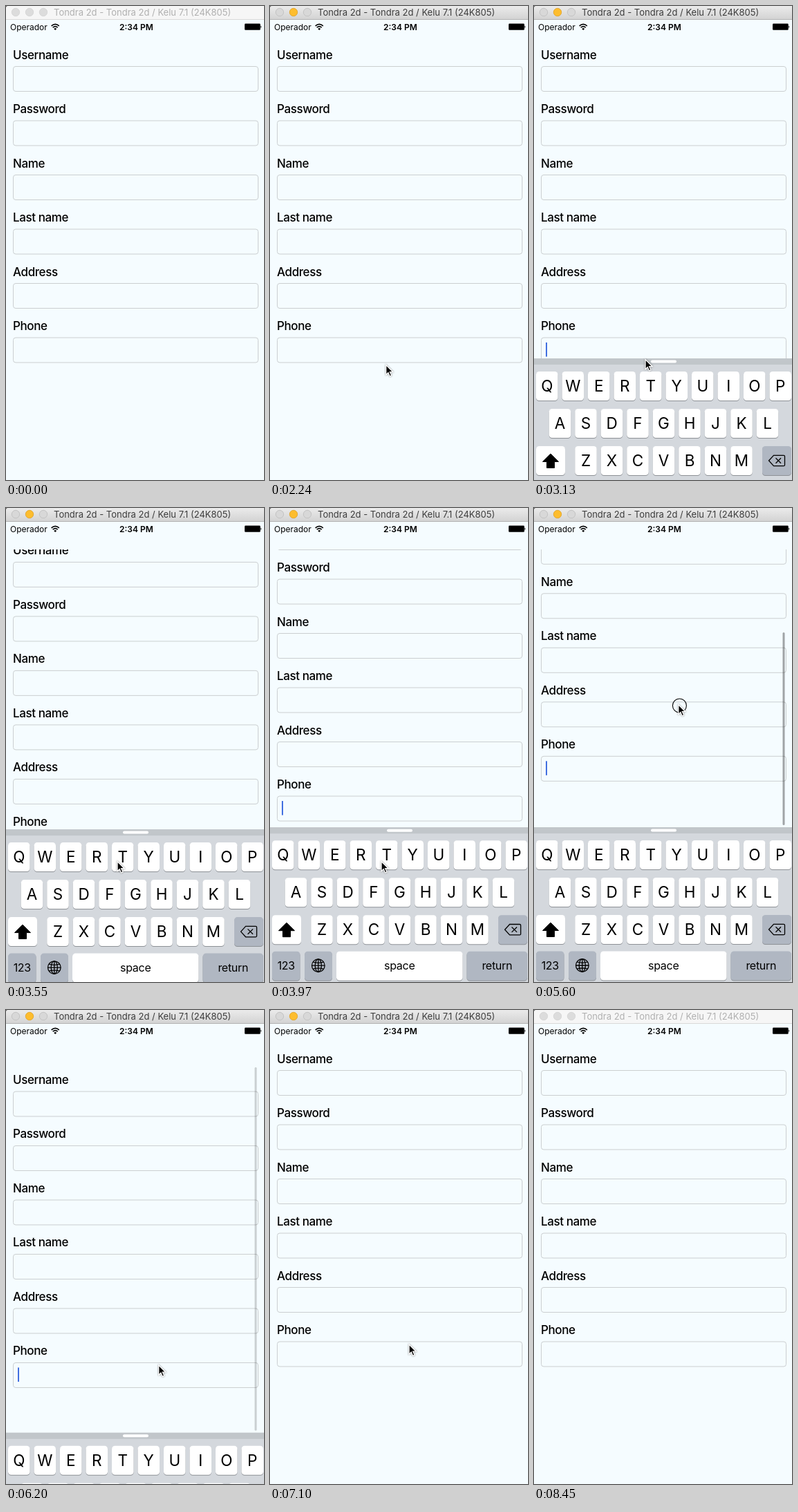
Write an HTML page that moves like this. It is 373x686 px and loops after 8550 ms.

```html
<!DOCTYPE html>
<html lang="en">
<head>
<meta charset="utf-8">
<title>Form with keyboard</title>
<style>
  html, body { margin: 0; width: 100%; height: 100%; overflow: hidden; background: #f5fcff; }
  svg { display: block; width: 100%; height: 100%; }
  text { font-family: Inter, Roboto, sans-serif; }
  .label { font-size: 17px; font-weight: 500; letter-spacing: -.4px; }
  .field { fill: none; stroke: #cbcfd0; }
  .status { font-size: 12px; }
  .clock { font-weight: 600; }
  .key { fill: #fff; }
  .key.dark { fill: #b0b7c2; }
  .shade { fill: #8d9196; }
  .cap { font-size: 22.5px; text-anchor: middle; }
  .word { font-size: 16px; letter-spacing: -.3px; text-anchor: middle; }
  .line { fill: none; stroke: #000; stroke-width: 1.3; }
  .title { font-size: 13px; fill: #b0b0b0; }
  .bar { fill: #f6f6f6; }
  .edge { fill: #d9d9d9; }
  .dot { fill: #dcdcdc; stroke: #d2d2d2; stroke-width: .8; }
  .active .title { fill: #3d3d3d; }
  .active .bar { fill: url(#chrome); }
  .active .edge { fill: #b3b3b3; }
  .active .dot { fill: #d8d8d8; stroke: #bdbdbd; }
  .active .amber { fill: #fdbd2e; stroke: #dfa023; }
  .arrow { stroke: #fff; stroke-width: 1.3; filter: drop-shadow(0 .8px .8px #0007); }
</style>
</head>
<body>
<svg viewBox="0 0 373 686">
  <defs>
    <linearGradient id="chrome" x2="0" y2="1">
      <stop stop-color="#ebebeb"/><stop offset="1" stop-color="#d2d2d2"/>
    </linearGradient>
    <clipPath id="view"><rect y="60" width="373" height="626"/></clipPath>
  </defs>
  <rect width="373" height="686" fill="#f5fcff"/>

  <g clip-path="url(#view)">
    <g id="form">
      <rect id="caret" x="17" y="487" width="2" height="20.5" fill="#426fe0"/>
    </g>
    <rect id="scrollbar" x="359.5" width="3" rx="1.5"/>
  </g>

  <g id="window">
    <rect class="bar" width="373" height="20"/>
    <rect class="edge" y="19" width="373" height="1"/>
    <path d="M0 0H2Q.5 .5 0 2Z" fill="#555"/>
    <circle class="dot" cx="14" cy="9" r="5.7"/>
    <circle class="dot amber" cx="34" cy="9" r="5.7"/>
    <circle class="dot" cx="54" cy="9" r="5.7"/>
    <text class="title" x="69" y="14">Tondra 2d - Tondra 2d / Kelu 7.1 (24K805)</text>
  </g>

  <text class="status" x="6" y="35">Operador</text>
  <g fill="none" stroke="#000" stroke-width="1.7">
    <path d="M65.6 28.9Q71.2 23.9 76.8 28.9M67.7 31.2Q71.2 28 74.7 31.2"/>
    <path d="M71.2 35L69.2 32.9Q71.2 31.2 73.2 32.9Z" fill="#000" stroke="none"/>
  </g>
  <text class="status clock" x="164" y="35">2:34 PM</text>
  <rect x="345" y="25.5" width="22.7" height="9.3" rx="1.2"/>
  <path d="M368.3 28.5Q370.3 30.2 368.3 32Z"/>

  <g id="keyboard">
    <rect width="373" height="230" fill="#d4d8dd"/>
    <rect width="373" height="9" fill="#c1c6ca"/>
    <rect x="169" y="2.5" width="37" height="4" rx="2" fill="#fff"/>
    <g id="keys"></g>
    <path d="M24 138L35.5 149.5H29.5V158.5H18.5V149.5H12.5Z" stroke="#000" stroke-linejoin="round"/>
    <path class="line" d="M339.5 148L346.5 140.3H361Q362.5 140.3 362.5 141.8V154.2Q362.5 155.7 361 155.7H346.5ZM349.5 144.3L357 151.7M357 144.3L349.5 151.7"/>
    <g class="line" transform="translate(69.8 200)">
      <circle r="9.3"/><ellipse rx="4.6" ry="9.3"/>
      <path d="M0 -9.3V9.3M-9.3 0H9.3M-7.5 -5Q0 -2.5 7.5 -5M-7.5 5Q0 2.5 7.5 5"/>
    </g>
  </g>

  <g id="cursor">
    <circle id="ring" cx="1.7" cy="1.5" r="10" fill="none" stroke="#000" stroke-width="1.1"/>
    <path class="arrow" d="M0 0V14.2L3.2 11.2L5.5 16.4L8 15.3L5.7 10.2H10.2Z"/>
  </g>
</svg>

<script>
const LOOP = 8550, START = 890, TICK = 146.5;
const VIEW_TOP = 60, KEYS_TOP = 462, STAGE = 686, CONTENT = 466;
const REST = -63, GRAB_Y = 407;
const KEYS_IN = 2841, PRESS = 4720, RELEASE = 6060;
const $ = id => document.getElementById(id);

function add(parent, tag, attrs, text) {
  const el = document.createElementNS("http://www.w3.org/2000/svg", tag);
  for (const name in attrs) el.setAttribute(name, attrs[name]);
  if (text) el.textContent = text;
  parent.appendChild(el);
}

["Username", "Password", "Name", "Last name", "Address", "Phone"].forEach((name, i) => {
  const y = i * 78.5;
  add($("form"), "text", { class: "label", x: 10, y: 76.5 + y }, name);
  add($("form"), "rect", { class: "field", x: 10.5, y: 87.5 + y, width: 354, height: 36, rx: 3.5 });
});

function key(x, y, width, text = "", kind = "cap", dark = "") {
  const box = { x, width, height: 42, rx: 4.5 };
  add($("keys"), "rect", { ...box, class: "shade", y: y + 1 });
  add($("keys"), "rect", { ...box, class: "key " + dark, y });
  add($("keys"), "text", { class: kind, x: x + width / 2, y: y + (kind == "cap" ? 29 : 26.3) }, text);
}

["QWERTYUIOP", "ASDFGHJKL", "ZXCVBNM"].forEach((row, r) =>
  [...row].forEach((c, i) => key(187.5 + (i - row.length / 2) * 37.5 + 3, 19 + r * 54, 31.5, c)));
key(3, 127, 42);
key(330, 127, 42, "", "cap", "dark");
key(3, 179.5, 40.5, "123", "word", "dark");
key(50, 179.5, 40, "", "word", "dark");
key(96, 179.5, 182.5, "space", "word");
key(284.5, 179.5, 87.5, "return", "word", "dark");

// Smooth progress from 0 at time a to 1 at time b.
function ease(t, a, b) {
  const k = Math.min(1, Math.max(0, (t - a) / (b - a)));
  return k * k * (3 - 2 * k);
}

// Each leg leads to x, y; bend bows it sideways like an arc.
const legs = [
  { from: 890, to: 1330, x: 100, y: 54 },
  { from: 1750, to: 2205, x: 167.7, y: 519.5, bend: [110, 0] },
  { from: 2210, to: 2800, x: 161, y: 511.5 },
  { from: 4100, to: 4690, x: 208, y: GRAB_Y },
  { from: PRESS, to: 5450, x: 208.7, y: 284.5 },
  { from: 5580, to: 6015, x: 220.7, y: 514 },
  { from: 6760, to: 7850, x: 369.5, y: 634.5, bend: [-80, -90] }
];

function pointerAt(t) {
  let x = 60, y = 8;
  for (const { from, to, x: endX, y: endY, bend = [0, 0] } of legs) {
    const k = ease(t, from, to), bow = 4 * k * (1 - k);
    x += (endX - x) * k + bend[0] * bow;
    y += (endY - y) * k + bend[1] * bow;
  }
  return { x, y };
}

// Rises with a decaying approach, follows the finger down, then drops away.
function keysAt(t, y) {
  if (t < KEYS_IN) return STAGE;
  const rise = (STAGE - KEYS_TOP) * Math.exp((KEYS_IN - t) / 160);
  const finger = t > PRESS ? Math.max(KEYS_TOP, y) : KEYS_TOP;
  return Math.min(STAGE, finger + rise + Math.max(0, t - RELEASE) * .94);
}

// Resistance when dragging past either end.
function rubber(raw) {
  const size = KEYS_TOP - VIEW_TOP;
  const pull = x => size * (1 - 1 / (x * .55 / size + 1));
  return raw < REST ? REST - pull(REST - raw) : raw > 0 ? pull(raw) : raw;
}

function scrollAt(t, y) {
  if (t < PRESS) return REST * ease(t, 3400, 3930);
  const held = rubber(REST + y - GRAB_Y), late = t - RELEASE;
  if (late < 0) return held;
  return late < 900 ? (22.8 + .61 * late) * Math.exp(-late / 100) : 0;
}

function show(id, on) { $(id).style.display = on ? "" : "none"; }
function shift(id, x, y) { $(id).setAttribute("transform", `translate(${x} ${y})`); }

function draw(now) {
  const t = START + Math.floor((now - START) / TICK) * TICK;
  const { x, y } = pointerAt(t), keys = keysAt(t, y), offset = scrollAt(t, y);
  shift("form", 0, offset);
  shift("keyboard", 0, keys);
  shift("cursor", x, y);

  const top = VIEW_TOP + 3 + (offset < 0 ? -offset * .97 : offset * .65);
  const length = (keys - VIEW_TOP - 6) ** 2 / CONTENT;
  $("scrollbar").setAttribute("y", top);
  $("scrollbar").setAttribute("height", Math.min(length, keys - 3 - top));
  $("scrollbar").setAttribute("opacity", .35 * (ease(t, 4650, 4840) - ease(t, 6000, 6330)));

  $("window").classList.toggle("active", now >= 900 && now < 8450);
  show("cursor", now >= 900 && now < 8000);
  show("ring", now >= PRESS && t < RELEASE);
  show("caret", now >= 2980 && keys < STAGE);
}

function frame(now) {
  draw(now % LOOP);
  requestAnimationFrame(frame);
}
draw(0);
requestAnimationFrame(frame);
</script>
</body>
</html>
```
